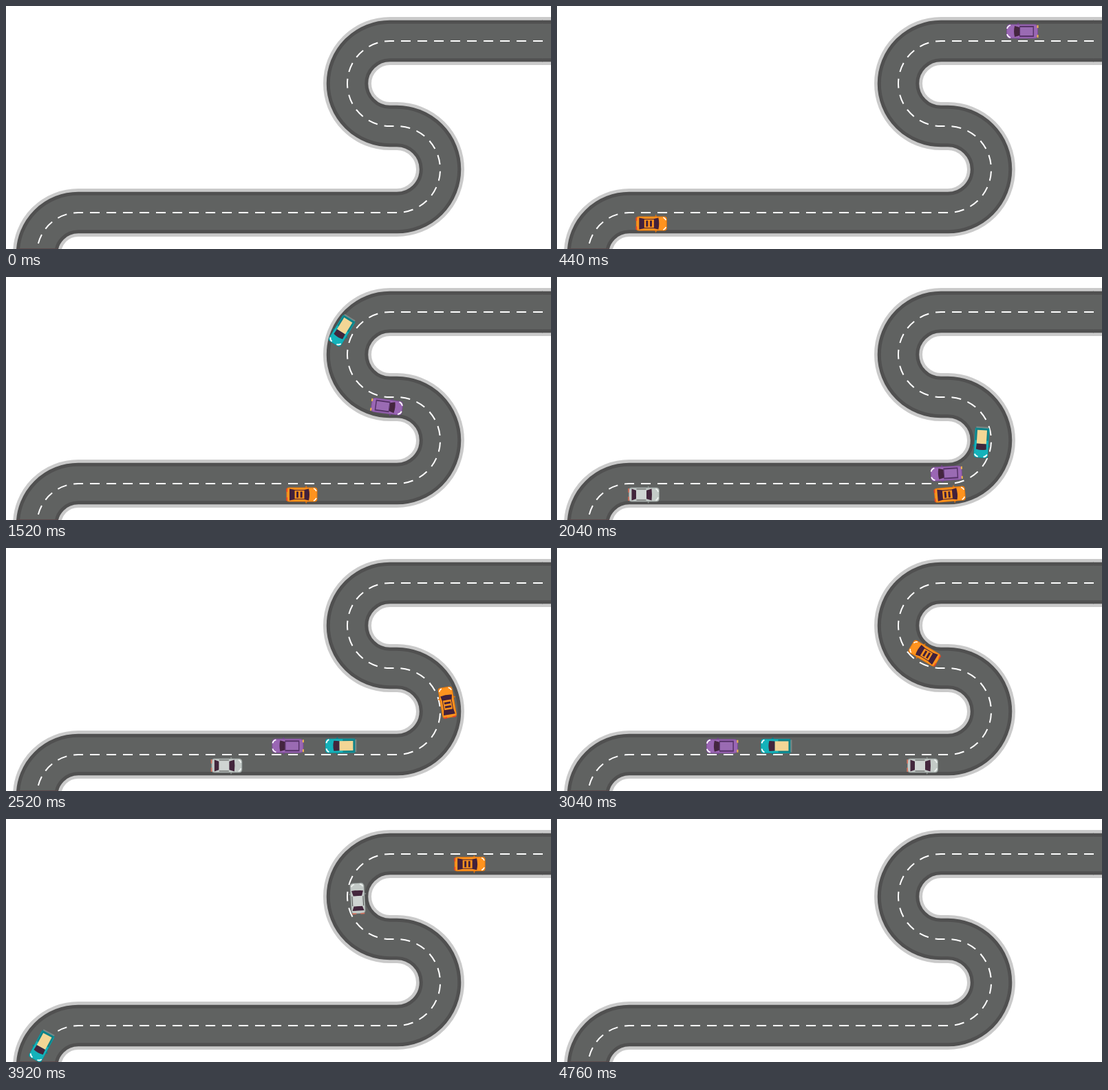
Write an HTML page that moves like this. It is 792 px wide and 354 px high and loops after 4800 ms.

```html
<!DOCTYPE html>
<html lang="en">
<head>
<meta charset="utf-8">
<title>Winding road</title>
<style>
html, body { margin: 0; width: 100%; height: 100%; overflow: hidden; background: #fff; }
svg { display: block; }
.road { fill: none; }
</style>
</head>
<body>
<svg width="792" height="354" viewBox="0 0 792 354">
  <defs>
    <path id="road" d="M780 51H558A62 62 0 0 0 558 175H568A63 63 0 0 1 568 301H105A60 60 0 0 0 45 361V420"/>
    <path id="down" d="M1200 37H575C530 40 476 62 480 113C483 155 512 183 555 189L569 190A48 48 0 0 1 569 286L540 288L105 289Q60 292 36 370L34 450"/>
    <path id="up" d="M60 430V361A45 45 0 0 1 105 317H564A78.5 78.5 0 0 0 564 160H558A47 47 0 0 1 558 66L900 65"/>
  </defs>
  <g class="road">
    <g stroke="#cacaca" stroke-width="70"><use href="#road"/><path d="M779 51H800"/></g>
    <g stroke="#505050" stroke-width="60.5"><use href="#road"/><path d="M779 51H800"/></g>
    <g stroke="#606261" stroke-width="50.5"><use href="#road"/><path d="M779 51H800"/></g>
    <path d="M16 353.5H76" stroke="#5a4b4d"/>
    <use href="#road" stroke="#fff" stroke-width="2" stroke-dasharray="14 10"/>
  </g>

  <!-- Cars face right and are centred on 0,0 -->
  <g id="purple">
    <path d="M4-10L6-13L8-10M4 10L6 13L8 10" fill="#6f4287"/>
    <rect x="-23" y="-10.5" width="46" height="21" rx="5" fill="#7d4f96"/>
    <rect x="-22" y="-9.5" width="44" height="19" rx="4" fill="#9a66b4"/>
    <path d="M-17-8H4V8H-17Z" fill="#563268"/>
    <path d="M4-6L11-8Q13 0 11 8L4 6Z" fill="#44263f"/>
    <rect x="-15.5" y="-6" width="18.5" height="12" fill="#9a6bb3"/>
    <path d="M-22.5-9V-5M-22.5 9V5" stroke="#f0b64c" stroke-width="2"/>
    <path d="M17-9Q21-8 22-4M17 9Q21 8 22 4" class="road" stroke="#fff" stroke-width="1.8"/>
  </g>
  <g id="teal">
    <path d="M3-10L5-13L7-10M3 10L5 13L7 10" fill="#0b7f87"/>
    <rect x="-22.5" y="-10.5" width="45" height="21" rx="4" fill="#0b858c"/>
    <rect x="-22" y="-10" width="44" height="20" rx="4" fill="#14b2ba"/>
    <path d="M-21-9.5H-3V9.5H-21Z" fill="#108188"/>
    <path d="M-22-9V9" stroke="#7e8583" stroke-width="2"/>
    <rect x="-18" y="-7" width="20" height="14" fill="#f3d695"/>
    <path d="M2-7L10-7.5Q12 0 10 7.5L2 7Z" fill="#42263c"/>
    <path d="M17-9Q20-8 21-4M17 9Q20 8 21 4" class="road" stroke="#fff" stroke-width="1.8"/>
  </g>
  <g id="orange">
    <path d="M5-10L6-13.5L8-10M5 10L6 13.5L8 10" fill="#d97212"/>
    <rect x="-22.5" y="-10.5" width="45" height="21" rx="4" fill="#e47a12"/>
    <rect x="-21.5" y="-9.5" width="43" height="19" rx="4" fill="#ff931e"/>
    <path d="M-18-8.5L-10-7H3L10-8.5Q12 0 10 8.5L3 7H-10L-18 8.5Z" fill="#42213b"/>
    <rect x="-10.5" y="-6" width="14" height="12" fill="#ff931e"/>
    <path d="M-6.5-4.5V4.5M-.8-4.5V4.5" stroke="#42213b" stroke-width="3"/>
    <path d="M-22-9V-4M-22 9V4" stroke="#e5432b" stroke-width="1.8"/>
    <path d="M17-9Q20-8 21-5M17 9Q20 8 21 5" class="road" stroke="#fff" stroke-width="1.6"/>
  </g>
  <g id="silver">
    <path d="M5-10L6-13L8-10M5 10L6 13L8 10" fill="#8c9290"/>
    <rect x="-22.5" y="-10.5" width="45" height="21" rx="4.5" fill="#929997"/>
    <rect x="-21.5" y="-9.5" width="43" height="19" rx="4" fill="#c3cac7"/>
    <path d="M-18-8.5L-11-6H3L11-8.5Q12 0 11 8.5L3 6H-11L-18 8.5Z" fill="#43263c"/>
    <rect x="-11.5" y="-6.5" width="15" height="13" fill="#cfd4d2"/>
    <path d="M-11-8H3M-11 8H3" stroke="#555" stroke-width="1"/>
    <path d="M-22.3-9V-3M-22.3 9V3" stroke="#d9705c" stroke-width="1.6"/>
    <path d="M17-8.5Q20-7 20.5-4M17 8.5Q20 7 20.5 4" class="road" stroke="#eef2f0" stroke-width="1.8"/>
  </g>
</svg>
<script>
const LOOP = 4800, STEP = 40;
const byId = id => document.getElementById(id);

// Distance travelled along the lane at time t (ms)
const cars = [
  ['purple', 'down', t => 380.5 + 0.326 * t],
  // catches up with the purple car, then follows at its speed
  ['teal', 'down', t => Math.min(420 + 0.476 * (t - 880), 1293 + 0.323 * (t - 3040))],
  ['orange', 'up', t => 51.8 + 0.271 * t],
  ['silver', 'up', t => -666 + 0.405 * t],
].map(([id, lane, distance]) => ({ node: byId(id), lane: byId(lane), distance }));

function place({ node, lane, distance }, t) {
  const s = Math.max(0, distance(t));
  const p = lane.getPointAtLength(s);
  const a = lane.getPointAtLength(Math.max(0, s - 7));
  const b = lane.getPointAtLength(s + 7);
  const angle = Math.atan2(b.y - a.y, b.x - a.x) * 180 / Math.PI;
  node.setAttribute('transform', `translate(${p.x} ${p.y}) rotate(${angle})`);
}

function draw() {
  const t = Math.floor(performance.now() % LOOP / STEP) * STEP;
  cars.forEach(car => place(car, t));
  requestAnimationFrame(draw);
}
draw();
</script>
</body>
</html>
```
